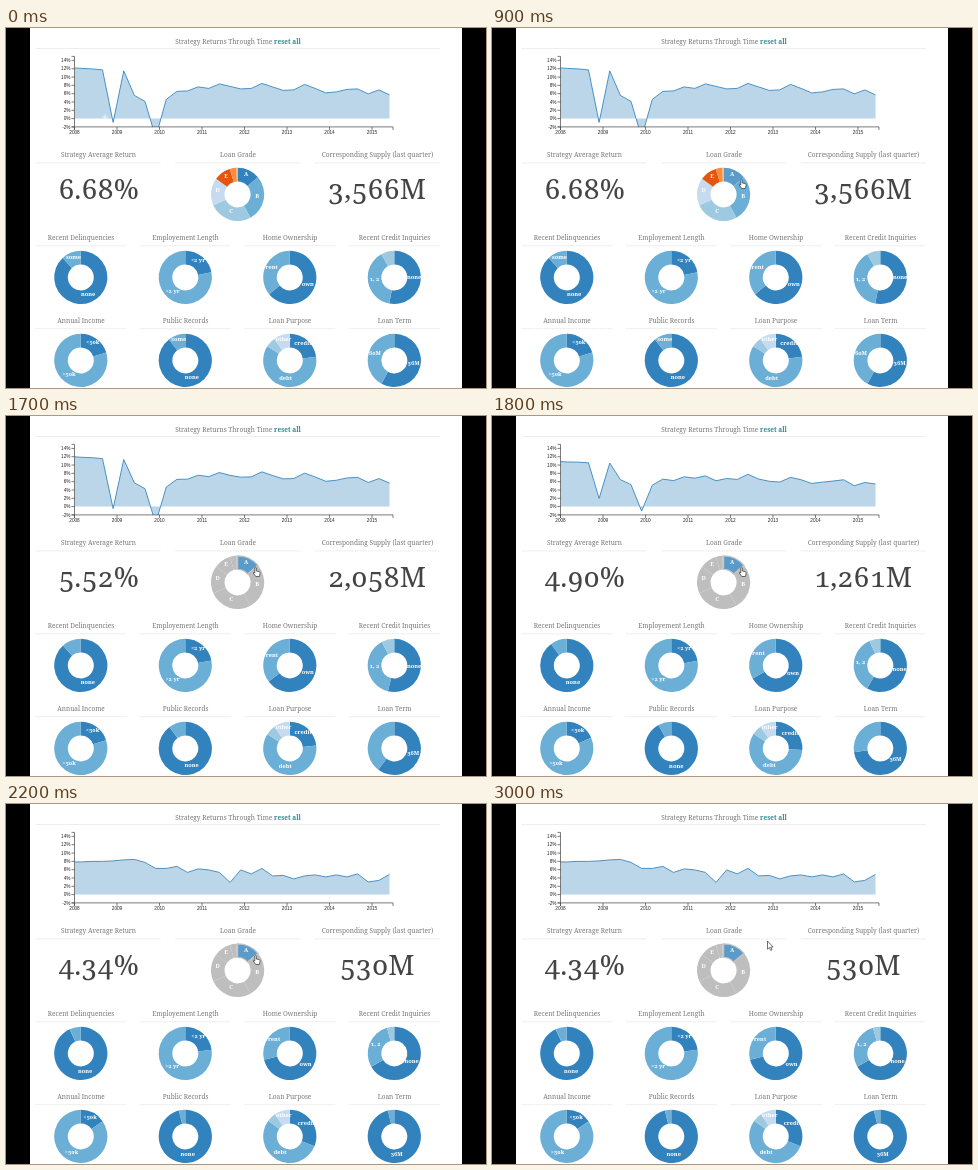
An HTML page that plays this animation: 480x360 px, repeating every 3100 ms.

```html
<!DOCTYPE html>
<html lang="en">
<head>
<meta charset="utf-8">
<title>Loan strategy dashboard</title>
<style>
  html, body { margin: 0; width: 100%; height: 100%; overflow: hidden; background: #000; }
  svg { display: block; }
  text { font: 6.5px "Noto Serif", serif; fill: #777; text-anchor: middle; }
  .axis text { font: 4.7px "Liberation Sans", Arial, sans-serif; fill: #222; }
  .axis path { fill: none; stroke: #444; stroke-width: .7; }
  .rule { stroke: #ddd; stroke-width: .8; stroke-dasharray: 1 .6; }
  .reset { font-weight: 700; fill: #2a8a94; }
  .label { font-size: 5.7px; font-weight: 600; fill: #fff; font-variant-numeric: oldstyle-nums; }
  .big { font-size: 28px; font-weight: 300; fill: #444; font-variant-numeric: oldstyle-nums; }
</style>
</head>
<body>
<svg width="480" height="360" viewBox="0 0 480 360">
  <clipPath id="plot"><path d="M68.5 26H388V98.5H68.5z"/></clipPath>
  <path fill="#fff" d="M24 0H456V360H24z"/>
  <g id="fixed"></g>
  <g id="live"></g>
</svg>
<script>
const LOOP = 3100, STEP = 100, CLICK = 1585;
const BLUES = ['#3182bd', '#6baed6', '#9ecae1', '#c6dbef'];
const GRADES = [...BLUES, '#e6550d', '#fd8d3c', '#fdae6b'];
const ZERO = 90.2, PER_CENT = 4.156;

// Height of the returns curve at each quarter, before and after filtering
const before = [39.5, 40, 40.5, 41.5, 94, 42.5, 67, 73, 109, 71, 63, 62.5, 58.5, 60, 55.5, 58,
  60.5, 60, 55, 58.5, 62, 61.5, 56, 60, 64.5, 63.5, 61, 60.5, 65.5, 61.5, 66.5];
const after = [57.5, 57.5, 57, 57, 56.5, 55.5, 55, 58, 64, 64, 62, 68, 64.5, 65.5, 68, 78,
  65.5, 69.5, 64, 71.5, 71, 74.5, 71.5, 70.5, 72.5, 70.5, 72.5, 69.5, 77.5, 76, 70];

// Slice end angles in degrees, before and after; the last slice closes the circle
const pies = [
  ['Recent Delinquencies', ['none', 'some'], [317], [335]],
  ['Employement Length', ['<2 yr', '>2 yr'], [79], [82]],
  ['Home Ownership', ['own', 'rent'], [231], [256]],
  ['Recent Credit Inquiries', ['none', '1, 2', ''], [191, 331], [240, 344]],
  ['Annual Income', ['<50k', '>50k'], [73], [55]],
  ['Public Records', ['none', 'some'], [322], [346]],
  ['Loan Purpose', ['credit', 'debt', '', 'other'], [82, 302, 324], [112, 306, 326]],
  ['Loan Term', ['36M', '60M'], [209], [346]],
];
const gradeEnds = [50, 151, 246, 306, 343, 357];

const clamp = v => Math.min(1, Math.max(0, v));
const mix = (a, b, p) => a + (b - a) * p;
const cubicInOut = t => t < .5 ? 4 * t ** 3 : 1 - 4 * (1 - t) ** 3;
const quadOutIn = t => (1 + Math.sign(t - .5) * (2 * t - 1) ** 2) / 2;
const escape = s => s.replace(/</g, '&lt;').replace(/>/g, '&gt;');
const text = (x, y, s, cls = '') => `<text class="${cls}" x="${x}" y="${y}">${escape(s)}</text>`;
const header = (x, y, half, s) =>
  text(x, y, s) + `<path class="rule" d="M${x - half} ${y + 5.5}h${2 * half}"/>`;
const point = (x, y, r, deg) => {
  const a = deg * Math.PI / 180;
  return [x + r * Math.sin(a), y - r * Math.cos(a)];
};

function slice(x, y, from, to, paint) {
  const big = to - from > 180 ? 1 : 0;
  const end = Math.min(to, 359.99);
  return `<path ${paint} d="M${point(x, y, 26.6, from)}A26.6 26.6 0 ${big} 1 ${point(x, y, 26.6, end)}` +
    `L${point(x, y, 13, end)}A13 13 0 ${big} 0 ${point(x, y, 13, from)}z"/>`;
}

function donut(x, y, ends, labels, colors, visible = () => true) {
  let slices = '', names = '', from = 0;
  [...ends, 360].forEach((to, i) => {
    slices += slice(x, y, from, to, `fill="${colors[i]}"`);
    if (labels[i] && visible(i)) names += text(...point(x, y, 20, (from + to) / 2), labels[i], 'label');
    from = to;
  });
  return slices + names;
}

function drawFixed() {
  let s = `<text x="232" y="15.6">Strategy Returns Through Time <tspan class="reset">reset all</tspan></text>` +
    '<path class="rule" d="M30 20.5H434"/>';
  ['Strategy Average Return', 'Loan Grade', 'Corresponding Supply (last quarter)']
    .forEach((name, i) => s += header(92.5 + 139.5 * i, 129.4, 62.5, name));
  pies.forEach(([name], i) =>
    s += header(75 + 104.5 * (i % 4), i < 4 ? 212.3 : 295.2, 45.5, name));
  fixed.innerHTML = s;
}

function drawChart(p) {
  const line = before.map((y, i) => [Math.max(68.5, 64.6 + 10.63 * i), mix(y, after[i], p)]).join('L');
  let axis = '<path d="M65.5 28H68.5V98.5H65.5M68.5 101.5V98.5H387V101.5"/>';
  for (let v = -2; v <= 14; v += 2) {
    const y = ZERO - v * PER_CENT;
    axis += `<path d="M65.5 ${y}h3"/><text style="text-anchor:end" x="64.5" y="${y + 1.7}">${v}%</text>`;
  }
  for (let i = 0; i < 8; i++) {
    const x = 68.5 + 42.5 * i;
    axis += `<path d="M${x} 98.5v3"/>` + text(x, 105.6, String(2008 + i));
  }
  return `<g transform="translate(0 .4)"><g clip-path="url(#plot)">` +
    `<path fill="#3182bd" fill-opacity=".33" d="M68.5 ${ZERO}L${line}V${ZERO}z"/>` +
    `<path fill="none" stroke="#3182bd" stroke-opacity=".85" d="M${line}"/></g><g class="axis">${axis}</g></g>`;
}

function drawCursor(t) {
  const come = cubicInOut(clamp(t / 450)), leave = cubicInOut(clamp((t - 2500) / 400));
  const x = mix(mix(99, 248.8, come), 275.5, leave), y = mix(mix(89, 151, come), 137, leave);
  const at = `transform="translate(${x} ${y})"`;
  if (y < 98) return `<path ${at} stroke="#fff" stroke-width=".7" d="M-3 0H3M0-3V3"/>`;
  const hand = t >= 400 && t < 2700;
  const shape = hand
    ? 'M0 .8Q.9-.2 1.5 .8V4L4.6 4.6Q5.4 5 5.2 6.5L4.6 9.5H1L-1.6 6Q-1.5 4.8 0 6z'
    : 'M0 0V8.2L1.9 6.5 3.2 9.4 4.5 8.8 3.2 6H5.6z';
  return `<path ${at} fill="#fff" stroke="#333" stroke-width=".7" d="${shape}"/>`;
}

function draw(t) {
  const progress = (ms, ease) => ease(clamp((t - CLICK) / ms));
  const chart = progress(500, cubicInOut), pie = progress(470, cubicInOut), count = progress(250, quadOutIn);
  const clicked = t >= CLICK, hovered = t >= 400;
  const gradeColors = GRADES.map((c, i) => i ? (clicked ? '#bebebe' : c) : (hovered ? '#5a9bca' : c));

  let s = drawChart(chart) +
    text(92.5, 170.8, mix(6.68, 4.34, count).toFixed(2) + '%', 'big') +
    text(371, 170.8, Math.round(mix(3566, 530, count)).toLocaleString('en-US') + 'M', 'big') +
    donut(231.6, 166.4, gradeEnds, [...'ABCDE'], gradeColors);
  if (clicked) s += slice(231.6, 166.4, 0, gradeEnds[0], 'fill="none" stroke="#c4c4c4" stroke-width="1.3"');

  pies.forEach(([, labels, a, b], i) => {
    const target = [0, ...(clicked ? b : a), 360];
    s += donut(74.8 + 104.5 * (i % 4), i < 4 ? 249.4 : 332.4, a.map((v, k) => mix(v, b[k], pie)),
      labels, BLUES, k => target[k + 1] - target[k] > 28.6);
  });
  live.innerHTML = s + drawCursor(t);
}

const fixed = document.getElementById('fixed'), live = document.getElementById('live');
let shown = -1;
function tick() {
  const t = Math.floor(performance.now() % LOOP / STEP) * STEP;
  if (t !== shown) draw(shown = t);
  requestAnimationFrame(tick);
}
drawFixed();
tick();
</script>
</body>
</html>
```
